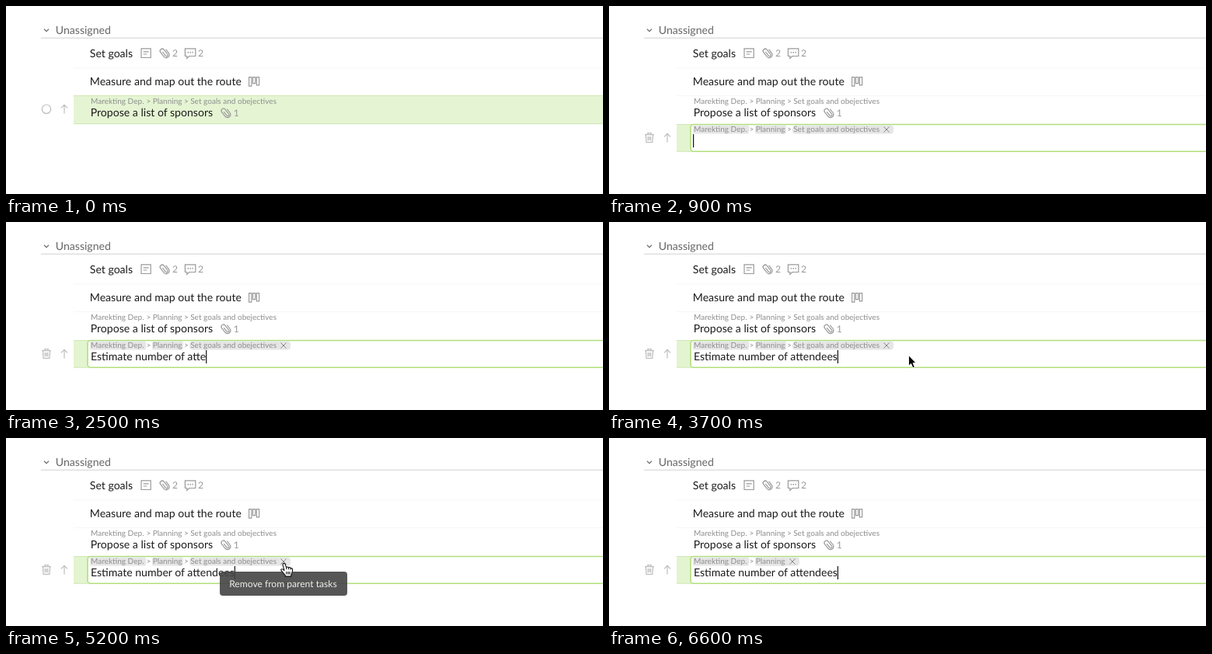
An HTML page that plays this animation: 768x242 px, repeating every 8 s.

```html
<!DOCTYPE html>
<html lang="en">
<head>
<meta charset="utf-8">
<title>Task list</title>
<style>
  html, body { margin: 0; width: 100%; height: 100%; overflow: hidden; background: #fff; }
  svg { display: block; width: 768px; height: 242px; }
  text { font-family: Lato, "Open Sans", sans-serif; white-space: pre; text-rendering: geometricPrecision; }
  .task { font-size: 14.08px; fill: #1c1c1c; }
  .group { font-size: 14.08px; fill: #666; }
  .path { font-size: 10.05px; fill: #8e8e8e; }
  .count { font-size: 12.1px; fill: #999; }
  .tip { font-size: 12.1px; fill: #f0f0f0; }
  .icon { fill: none; stroke: #9a9a9a; stroke-width: 1.2; }
  .tool { fill: none; stroke: #bdbdbd; stroke-width: 1.2; }
  .chip { fill: #e6e6e6; }
  .rule { stroke: #f7f7f7; }
</style>
</head>
<body>
<svg viewBox="0 0 768 242">
  <defs>
    <path id="clip" class="icon" transform="rotate(-38)"
      d="M-1.3-3V3.4a1.6 1.6 0 0 0 3.2 0V-4.2a2.7 2.7 0 0 0-5.5 0V3.4a3.9 3.9 0 0 0 7.7 0V-3"/>
    <path id="up" class="tool" d="M0 5.8V-5.3M-4.1-1.3 0-5.4 4.1-1.3"/>
    <path id="cross" d="M-3.6-3.6 3.6 3.6M3.6-3.6-3.6 3.6" stroke="#888"/>
    <g id="parents" class="path">
      <text x="109">Marekting Dep.</text>
      <text x="180.4">&gt;</text>
      <text x="188.7">Planning</text>
    </g>
    <g id="lastParent" class="path">
      <text x="229">&gt;</text>
      <text x="237.2">Set goals and obejectives</text>
    </g>
  </defs>

  <!-- group heading -->
  <path d="M48.9 29.6 52 32.7 55.1 29.6" fill="none" stroke="#666" stroke-width="1.2"/>
  <text class="group" x="63.8" y="36">Unassigned</text>
  <path d="M45 41.3H768" stroke="#e0e0e0" stroke-width="1.5"/>

  <!-- first task -->
  <text class="task" x="107.8" y="66">Set goals</text>
  <path class="icon" d="M174 54.9h12.2v11.6h-12.2zM176.7 58.9h7M176.7 62h4.6"/>
  <use href="#clip" transform="translate(204.2 60.7)"/>
  <text class="count" x="214" y="65.3">2</text>
  <path class="icon" d="M230.4 54.9h13.4v9.6h-8l-3 2.9v-2.9h-2.4z"/>
  <path d="M233.6 59.8h7.4" stroke="#9a9a9a" stroke-width="1.5" stroke-dasharray="1.5 1.4"/>
  <text class="count" x="247.1" y="65.3">2</text>
  <path class="rule" d="M87 79.5H768"/>

  <!-- second task -->
  <text class="task" x="107.8" y="102">Measure and map out the route</text>
  <path class="icon" d="M312.6 91.6h3.2v11.6h-3.2zM317.5 91.6h3.2v8h-3.2zM322.4 91.6h3.2v10.2h-3.2z"/>

  <!-- third task -->
  <path class="rule" d="M87 115.5H768"/>
  <g id="hovered">
    <path d="M87 115H768V152H87z" fill="#e5f5d3"/>
    <path d="M87 115.4H768M87 151.6H768" stroke="#cfe7b3"/>
    <circle class="tool" cx="52" cy="132.7" r="5.7"/>
    <use href="#up" x="75" y="132.7"/>
  </g>
  <use href="#parents" y="126"/>
  <use href="#lastParent" y="126"/>
  <text class="task" x="108.7" y="142">Propose a list of sponsors</text>
  <use href="#clip" transform="translate(283 137.6)"/>
  <text class="count" x="292.8" y="142.3">1</text>

  <!-- new task -->
  <g id="editor">
    <path class="tool" d="M46 165.6h12M49.8 165.4v-1.8h4.4v1.8M47.4 165.8l.7 9.6h7.8l.7-9.6M50.2 168v5M52 168v5M53.8 168v5"/>
    <use href="#up" x="75" y="169.7"/>
    <path d="M87 152H108V187.5H87z" fill="#e3f4d0"/>
    <path d="M87 152.5H108M87 187.2H108" stroke="#cfe7b3"/>
    <rect x="105" y="152.5" width="680" height="34.7" rx="4" fill="#fff" stroke="#b2de7e" stroke-width="1.6"/>
    <rect class="chip" x="108" y="153.5" width="72" height="11" rx="2"/>
    <rect class="chip" x="188" y="153.5" width="40" height="11" rx="2"/>
    <g id="longPath">
      <rect class="chip" x="236" y="153.5" width="130" height="11" rx="4"/>
      <use href="#lastParent" y="162.2"/>
      <use href="#cross" x="357" y="159"/>
    </g>
    <g id="shortPath">
      <rect class="chip" x="188" y="153.5" width="57" height="11" rx="4"/>
      <use href="#cross" x="236" y="159"/>
    </g>
    <use href="#parents" y="162.2"/>
    <text id="typed" class="task" x="108.9" y="178"></text>
    <path id="caret" d="M0 165V182" stroke="#111" stroke-width="1.2"/>
  </g>

  <g id="tooltip">
    <rect x="275" y="172" width="164" height="31" rx="4" fill="#444"/>
    <text class="tip" x="287.2" y="192.2">Remove from parent tasks</text>
  </g>

  <g id="pointer">
    <path id="arrow" d="M0 0V13.6L3.1 10.8 5.4 16.2 7.9 15.1 5.6 9.9H9.6z"
      fill="#000" stroke="#fff" stroke-width="1" stroke-linejoin="round"/>
    <g id="hand" stroke="#111" stroke-width="1.1" stroke-linejoin="round">
      <path fill="#fff" d="M-1.8 1.2C-1.8-.6 1-.8 1.4 1L2.8 5C3.4 4 5.4 4.2 5.7 5.2 6.5 4.5 8.1 5 8.4 6 9.4 5.5 10.8 6.3 10.8 7.7 11 11 9.8 12.5 9 14.5V16.5H1.4V15C-.4 13-1.9 11-4 8.8-4.4 7.2-2.6 6.6-1.4 7.6L.2 9z"/>
      <path fill="none" d="M2.8 5 3.2 7.4M5.7 5.2 5.9 7.6M8.4 6V8M3 10.5V13.8M5.2 10.5V13.8M7.2 10.5V13.8"/>
    </g>
  </g>
</svg>

<script>
const LOOP = 8000, STEP = 100;
const TITLE = "Estimate number of attendees";
const $ = id => document.getElementById(id);
const show = (id, opacity) => $(id).setAttribute("opacity", opacity);

// Linear interpolation through [time, value] points, held at both ends.
function track(t, ...points) {
  let [t0, v0] = points[0];
  for (const [t1, v1] of points) {
    if (t < t1) return t <= t0 ? v0 : v0 + (v1 - v0) * (t - t0) / (t1 - t0);
    [t0, v0] = [t1, v1];
  }
  return v0;
}

function draw(t) {
  const editing = t >= 900;
  show("hovered", editing ? 0 : 1);
  show("editor", editing ? 1 : 0);

  const typed = $("typed");
  const count = Math.round(track(t, [1700, 0], [2500, 23], [2600, 24], [3300, 28]));
  const text = TITLE.slice(0, count);
  if (typed.textContent !== text) typed.textContent = text;
  const caretX = count ? 109.3 + typed.getComputedTextLength() : 108.6;
  $("caret").setAttribute("transform", `translate(${caretX} 0)`);

  const removed = track(t, [6400, 0], [6600, 1]);
  show("longPath", 1 - removed);
  show("shortPath", removed);
  show("tooltip", track(t, [5000, 0], [5200, 0.9], [5400, 1]) * (1 - removed));

  const x = track(t, [4500, 385.4], [5000, 357.8]);
  const y = track(t, [4500, 171.6], [5000, 161.6]);
  const overCross = t >= 4900;
  $("pointer").setAttribute("transform", `translate(${x} ${y})`);
  show("pointer", track(t, [3500, 0], [3700, 1]) * (1 - removed));
  show("arrow", overCross ? 0 : 1);
  show("hand", overCross ? 1 : 0);
}

const start = performance.now();
function tick() {
  const t = (performance.now() - start) % LOOP;
  draw(Math.floor(t / STEP) * STEP);
  requestAnimationFrame(tick);
}
tick();
</script>
</body>
</html>
```
